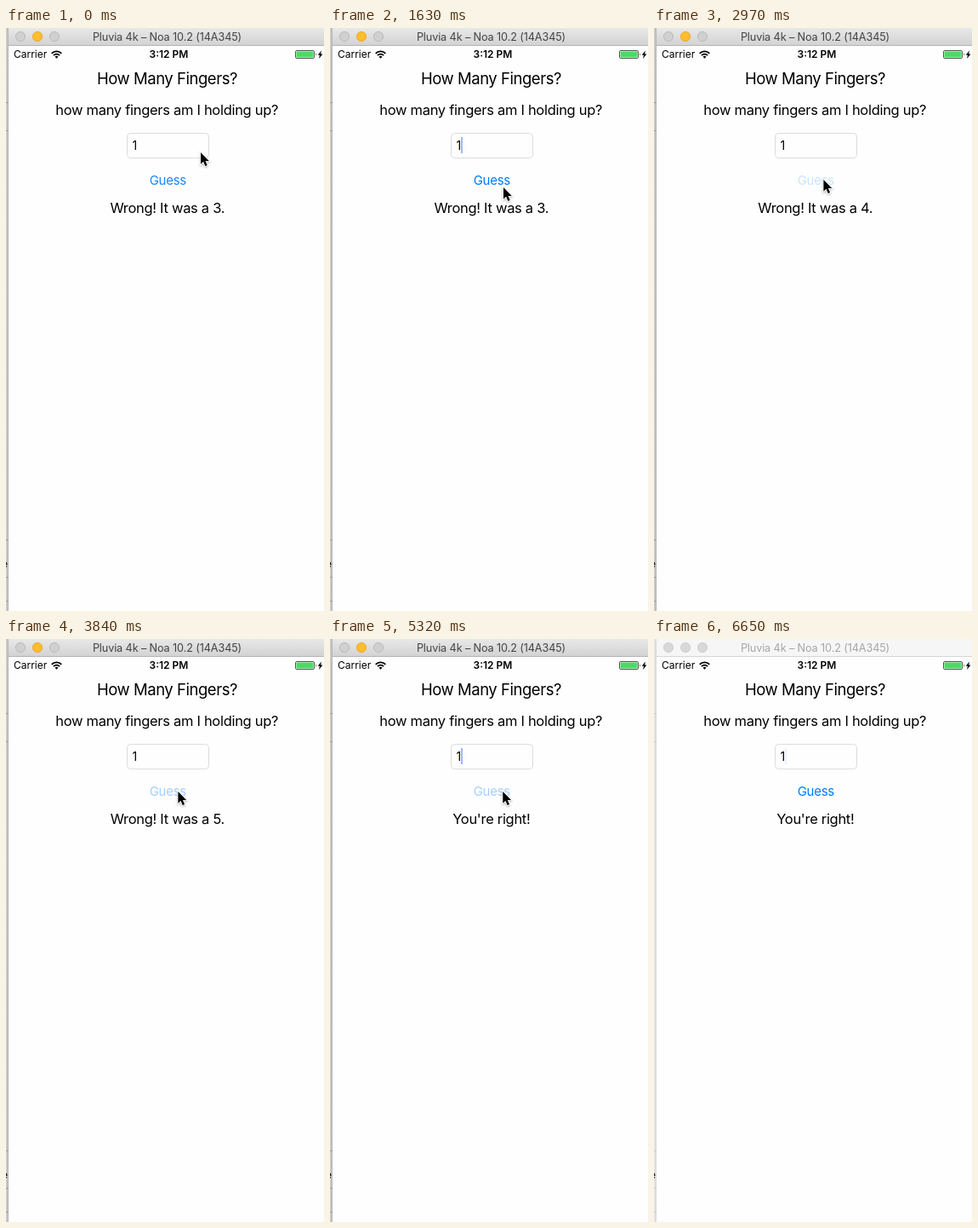
Animation of 374x684 px, one loop 6.75 s. Source, as an HTML page:

```html
<!DOCTYPE html>
<html lang="en">
<head>
<meta charset="utf-8">
<title>How Many Fingers?</title>
<style>
  html, body { margin: 0; width: 100%; height: 100%; overflow: hidden; background: #fefefe; }
  svg { display: block; width: 374px; height: 684px; }
  text { font-family: Inter, Roboto, sans-serif; }
  .mid { text-anchor: middle; letter-spacing: -.018em; }
  .body { font-size: 16.5px; }
  .light { fill: #d0d0d0; stroke: #bababa; }
  #title { font-size: 12.7px; letter-spacing: -.01em; fill: #434343; }
  #cursor { filter: drop-shadow(0 1px 1px rgba(0, 0, 0, .3)); }
  .idle #bar { fill: #f6f6f6; }
  .idle #barLine { fill: #d5d5d5; }
  .idle #title { fill: #a6a6a6; }
  .idle .light, .idle #amber { fill: #d8d8d8; stroke: #cecece; }
  .idle #behind { opacity: .5; }
</style>
</head>
<body>
<svg id="stage" viewBox="0 0 374 684">
  <defs>
    <linearGradient id="chrome" x2="0" y2="1">
      <stop stop-color="#e8e8e8"/><stop offset="1" stop-color="#d3d3d3"/>
    </linearGradient>
    <linearGradient id="shade">
      <stop stop-color="#d2d2d2"/><stop offset="1" stop-color="#b2b2b2"/>
    </linearGradient>
  </defs>
  <rect width="374" height="684" fill="#fefefe"/>

  <g id="behind">
    <rect width="3" height="684" fill="url(#shade)"/>
    <path d="M0 87.5h3M0 120.5h3M0 600.5h3M0 644.5h3M0 672.5h3" stroke="#9c9c9c"/>
  </g>
  <svg width="3" height="684"><text x="-5" y="633" font-size="12">e</text></svg>

  <rect id="bar" x="3" width="371" height="20" fill="url(#chrome)"/>
  <rect id="barLine" x="3" y="20" width="371" height="1" fill="#b5b5b5"/>
  <circle class="light" cx="17" cy="10" r="5.6"/>
  <circle id="amber" cx="37" cy="10" r="5.6" fill="#fdbd2e" stroke="#e6aa35"/>
  <circle class="light" cx="57" cy="10" r="5.6"/>
  <text id="title" class="mid" x="189.5" y="15">Pluvia 4k – Noa 10.2 (14A345)</text>

  <text x="9" y="35.3" font-size="12">Carrier</text>
  <g fill="none" stroke="#000" stroke-width="1.8">
    <path d="M53.7 29.8a8.2 8.2 0 0 1 11.6 0M55.9 32.1a5.1 5.1 0 0 1 7.2 0"/>
    <path d="M59.5 35.8l-2-2a2.8 2.8 0 0 1 4 0z" fill="#000" stroke="none"/>
  </g>
  <text class="mid" x="191.5" y="35.3" font-size="12" font-weight="600" style="letter-spacing:0">3:12 PM</text>
  <rect x="340.5" y="26.5" width="22" height="9" rx="1.5" fill="#fff" stroke="#555"/>
  <rect x="341.5" y="27.5" width="20" height="7" rx=".5" fill="#4cd964"/>
  <path d="M364 29.5q1.5 1.5 0 3z"/>
  <path d="M371 26.5l-4.3 5.2h2.3l-1 4.3 4.5-5.6h-2.4z"/>

  <text class="mid" x="189.5" y="66" font-size="18.5" style="letter-spacing:-.025em">How Many Fingers?</text>
  <text class="mid body" x="189.2" y="102">how many fingers am I holding up?</text>
  <rect x="142.5" y="123.5" width="96" height="29" rx="4" fill="none" stroke="#dcdcdc"/>
  <text x="148.6" y="142.5" font-size="14">1</text>
  <rect id="caret" x="154.5" y="128" width="1" height="19" fill="#426bf2"/>
  <text id="guess" class="mid" x="190.3" y="183.5" font-size="15" fill="#007aff">Guess</text>
  <text id="result" class="mid body" x="189.8" y="217"></text>
  <path id="cursor" d="M0 0V13.8L3.1 10.8 5.3 16 7.7 15 5.5 9.9H9.8Z"
        stroke="#fff" stroke-width="1.8" paint-order="stroke"/>
</svg>
<script>
const LOOP = 6750, STEP = 147.6;
const $ = id => document.getElementById(id);

// pointer stops: step, x, y
const path = [
  [0, 229, 146], [2, 229.5, 146], [10, 229.5, 146], [11, 204, 187], [13, 199.4, 178],
  [20, 199.4, 178], [26, 202.4, 179], [36, 203.3, 179], [38, 203.3, 179], [41, 311, 661]
];
// button: step pressed, step released
const taps = [[13, 15], [20, 25], [31, 35]];
const answers = ["Wrong! It was a 3.", "Wrong! It was a 4.", "Wrong! It was a 5.", "You're right!"];
const fade = [.2, .35, .6, .85];

function pointer(i) {
  const n = path.findIndex(p => p[0] >= i);
  if (n < 1) return path[0].slice(1);
  const [a, b] = [path[n - 1], path[n]];
  const k = (i - a[0]) / (b[0] - a[0]);
  return [1, 2].map(c => a[c] + (b[c] - a[c]) * k);
}

function buttonAlpha(i) {
  if (i === 0) return .9;
  for (const [down, up] of taps)
    if (i >= down && i < up + fade.length) return fade[Math.max(0, i - up)];
  return 1;
}

function caretAlpha(i) {
  const p = (i * 147.8 + 245) % 985;
  return p < 100 ? .2 : p < 280 ? 0 : p < 430 ? .5 : 1;
}

function draw(now) {
  const i = Math.floor(now % LOOP / STEP);
  const [x, y] = i > 41 ? [0, 900] : pointer(i);
  $("cursor").setAttribute("transform", `translate(${x} ${y})`);
  $("guess").style.opacity = buttonAlpha(i);
  $("caret").style.opacity = caretAlpha(i);
  $("result").textContent = answers[taps.filter(t => i >= t[1]).length];
  $("stage").classList.toggle("idle", i >= 45);
}

let start;
function tick(now) {
  start ??= now;
  draw(now - start);
  requestAnimationFrame(tick);
}
draw(0);
requestAnimationFrame(tick);
</script>
</body>
</html>
```
